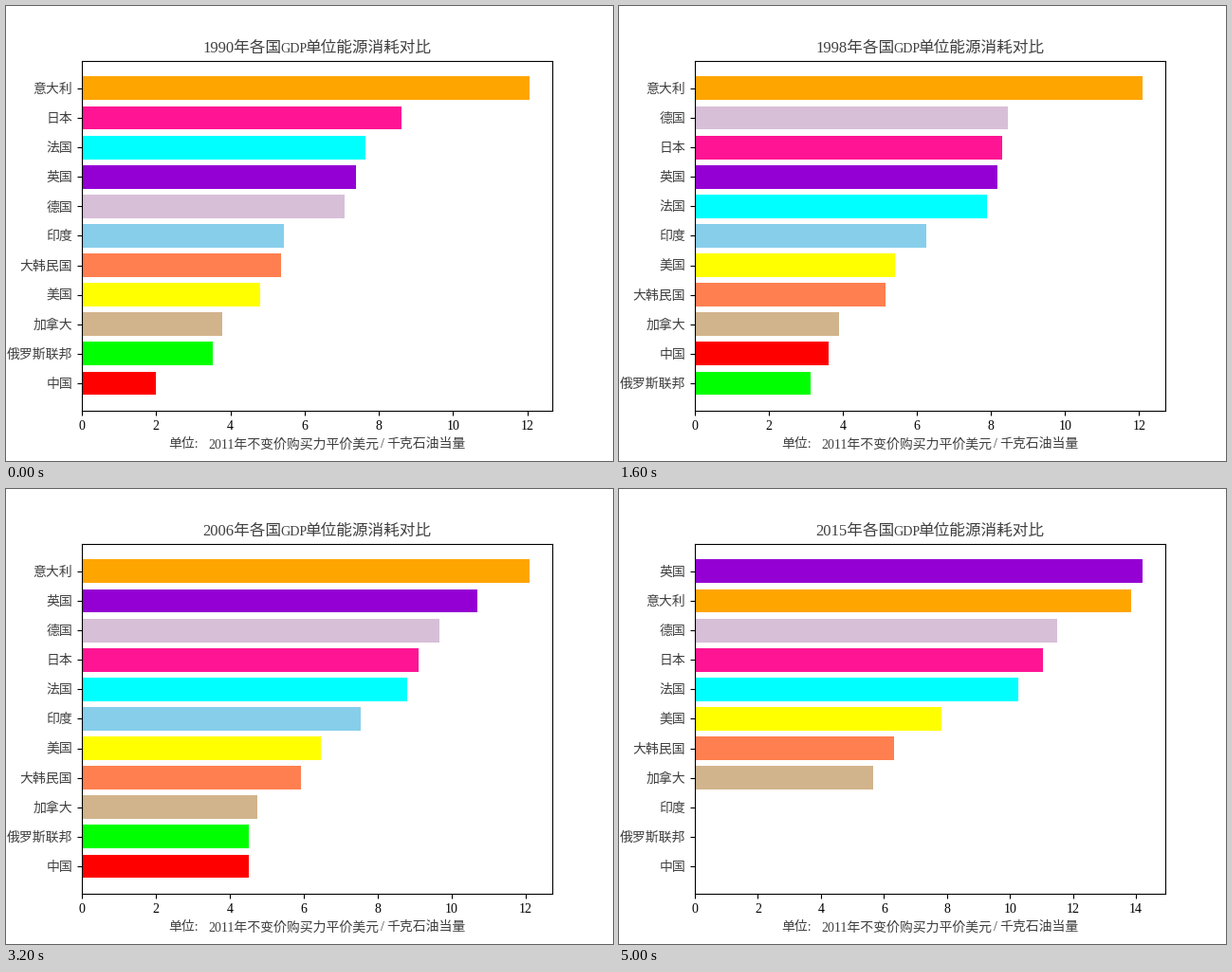
Animation of 640 by 480 pixels, one loop 5200 ms. Source, as a matplotlib script:

```python
import numpy as np
import matplotlib.pyplot as plt
from matplotlib.animation import FuncAnimation
from matplotlib.ticker import MultipleLocator

plt.rcParams["font.family"] = ["Liberation Serif", "Noto Sans CJK JP"]

FIRST, LAST = 1990, 2015
KEY_YEARS = [1990, 1996, 2000, 2003, 2008, 2013, 2015]
INK = "0.25"

# country, bar colour, values at the key years (no last value: no data in the last year)
COUNTRIES = [
    ("中国", "red", [1.99, 3.15, 4.10, 4.22, 4.72, 5.38]),
    ("俄罗斯联邦", "lime", [3.53, 2.92, 3.35, 3.79, 5.01, 5.04]),
    ("印度", "skyblue", [5.44, 5.98, 6.50, 7.14, 7.80, 8.34]),
    ("加拿大", "tan", [3.78, 3.71, 4.08, 4.27, 5.06, 5.47, 5.66]),
    ("大韩民国", "coral", [5.37, 5.11, 5.19, 5.56, 6.18, 6.23, 6.32]),
    ("美国", "yellow", [4.80, 5.12, 5.68, 6.03, 6.73, 7.41, 7.83]),
    ("法国", "cyan", [7.64, 7.41, 8.39, 8.26, 9.13, 9.75, 10.27]),
    ("日本", "deeppink", [8.61, 8.32, 8.28, 8.68, 9.39, 10.40, 11.05]),
    ("德国", "thistle", [7.08, 7.97, 8.95, 9.01, 10.09, 10.82, 11.50]),
    ("英国", "darkviolet", [7.39, 7.56, 8.80, 9.61, 11.40, 12.71, 14.22]),
    ("意大利", "orange", [12.07, 12.02, 12.19, 11.79, 12.32, 13.31, 13.85]),
]

W, H = 640, 480
MID = 328  # centre of the axes in pixels
fig = plt.figure(figsize=(W / 100, H / 100), dpi=100)
ax = fig.add_axes([0.125, 0.11, 0.775, 0.77])


def line(parts, ems, size, base):
    """Set (offset in ems, text, relative size) parts on one centred baseline."""
    em = size * 100 / 72
    left = MID - ems * em / 2
    return [fig.text((left + off * em) / W, 1 - base / H, text, size=size * rel,
                     color=INK, va="baseline", ha="left") for off, text, rel in parts]


title = line([(0, "", 1), (4.92, "GDP", 0.84), (6.5, "单位能源消耗对比", 1)],
             14.5, 12, 49.3)[0]
line([(0, "单位:", 1), (3, "2011年不变价购买力平价美元", 1),
      (16.1, "/", 1), (16.5, "千克石油当量", 1)], 22.5, 10, 466.3)


def value(year, points):
    if year == LAST and len(points) < len(KEY_YEARS):
        return 0
    return np.interp(year, KEY_YEARS[:len(points)], points)


def draw(i):
    year = FIRST + i
    rows = sorted(((value(year, points), name, color) for name, color, points in COUNTRIES),
                  key=lambda row: row[0])
    values, names, colors = zip(*rows)
    ax.cla()
    ax.barh(range(len(rows)), values, color=colors)
    ax.set_yticks(range(len(rows)), names, color=INK)
    ax.set_xlim(0, max(values) * 1.05)
    ax.set_ylim(-0.94, len(rows) - 0.06)
    ax.xaxis.set_major_locator(MultipleLocator(2))
    title.set_text(f"{year}年各国")


anim = FuncAnimation(fig, draw, frames=LAST - FIRST + 1, init_func=lambda: draw(0),
                     interval=200, repeat=True, repeat_delay=0)
plt.show()
```
